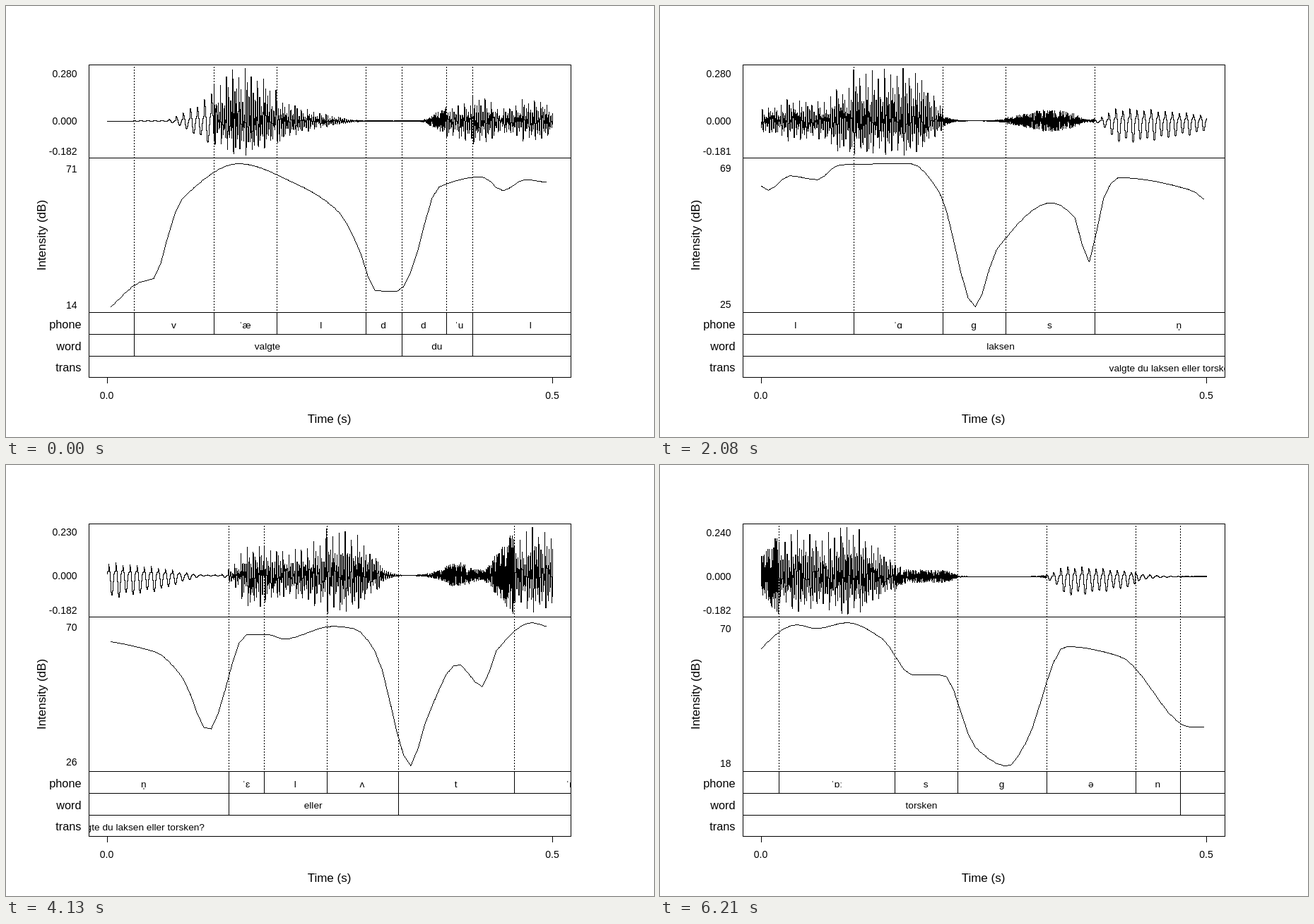
Recreate the animation shown at these times as an HTML page with a canvas. Size 917 by 611 pixels, loop 6250 ms.

```html
<!DOCTYPE html>
<html lang="da">
<head>
<meta charset="utf-8">
<title>Scrolling speech plot</title>
<style>
  html, body { margin: 0; width: 100%; height: 100%; overflow: hidden; background: #fff; }
  canvas { display: block; }
</style>
</head>
<body>
<canvas id="plot" width="917" height="611"></canvas>
<script>
const ctx = document.getElementById('plot').getContext('2d');
const LOOP = 6250, FRAMES = 150;
const PX_PER_S = 1262, SCROLL = 1.3 * PX_PER_S / (FRAMES - 1);
const LEFT = 117, RIGHT = 799, X0 = 143, X1 = 774, X_END = 2430;
const FONT = '"Liberation Sans", Arial, "DejaVu Sans", sans-serif';

// Start in seconds, label, sound, gain above and below zero
const phones = [
  [0.03, 'v', 'hum', 0.9, 0.9],
  [0.12, 'ˈæ', 'buzz', 1.035, 0.668],
  [0.19, 'l', 'buzz', 0.8, 0.7],
  [0.29, 'd', 'hiss', 1, 1],
  [0.33, 'd', 'hiss', 0.6, 0.6],
  [0.38, 'ˈu', 'buzz', 0.7, 0.8],
  [0.41, 'l', 'buzz', 0.9, 0.85],
  [0.54, 'ˈɑ', 'buzz', 1.37, 0.89],
  [0.64, 'ɡ', 'hiss', 0.6, 0.6],
  [0.71, 's', 'hiss', 1.3, 1.2],
  [0.81, 'n̩', 'hum', 0.55, 0.95],
  [1.00, 'ˈɛ', 'buzz', 0.93, 1],
  [1.04, 'l', 'buzz', 0.95, 0.85],
  [1.11, 'ʌ', 'buzz', 1.12, 0.91],
  [1.19, 't', 'hiss', 1.3, 1.2],
  [1.32, 'ˈɒː', 'buzz', 1.03, 0.78],
  [1.45, 's', 'hiss', 1.3, 1.2],
  [1.52, 'ɡ', 'hiss', 0.6, 0.6],
  [1.62, 'ə', 'hum', 0.57, 1.05],
  [1.72, 'n', 'hum', 0.6, 0.6],
  [1.77, '', 'hiss', 1, 1]
];
const words = [
  [0.03, 'valgte'], [0.33, 'du'], [0.41, 'laksen'], [1.00, 'eller'], [1.19, 'torsken'], [1.77, '']
];
const phrase = [[0.03, 'valgte du laksen eller torsken?'], [1.77, '']];

// Peaks, dips and bends of the intensity: x, dB
const bends = [
  [148, 13], [189, 23.4], [209, 25], [239, 52.3], [252, 59.3], [329, 73.2], [411, 64.6],
  [472, 52.6], [502, 35.4], [522, 20], [555, 19.5], [573, 28], [612, 63.3], [674, 67.7],
  [703, 61.8], [734, 66.5], [773, 65.2], [804, 70], [905, 70.4], [946, 61.2], [996, 24.3],
  [1027, 42.7], [1105, 57.8], [1137, 53.2], [1157, 38.6], [1178, 59.1], [1198, 65.9],
  [1300, 62], [1340, 53.5], [1376, 36.3], [1430, 67.6], [1462, 67.6], [1482, 66],
  [1552, 70.2], [1583, 69.4], [1613, 61.8], [1663, 24.8], [1683, 38.6], [1729, 57.9],
  [1764, 50.6], [1785, 62.5], [1834, 71.4], [1862, 69.9], [1905, 72.2], [1956, 65.8],
  [1996, 52.2], [2042, 52], [2087, 24], [2133, 16.8], [2158, 25.7], [2214, 63],
  [2291, 59.2], [2391, 31.9]
];

let seed = 71;
function random() {
  seed = seed + 0x6D2B79F5 | 0;
  let r = Math.imul(seed ^ seed >>> 15, 1 | seed);
  r = r + Math.imul(r ^ r >>> 7, 61 | r) ^ r;
  return ((r ^ r >>> 14) >>> 0) / 4294967296;
}

// Monotone cubic through the given points
function curve(pts) {
  const last = pts.length - 1;
  const secant = i => (pts[i + 1][1] - pts[i][1]) / (pts[i + 1][0] - pts[i][0]);
  const slopes = pts.map((p, i) => {
    if (i === 0) return secant(0);
    if (i === last) return 0;
    const a = secant(i - 1), b = secant(i);
    return a * b <= 0 ? 0 : 2 * a * b / (a + b);
  });
  return x => {
    if (x <= pts[0][0]) return pts[0][1];
    if (x >= pts[last][0]) return pts[last][1];
    let i = 0;
    while (pts[i + 1][0] < x) i++;
    const [xa, ya] = pts[i], [xb, yb] = pts[i + 1];
    const h = xb - xa, u = (x - xa) / h, v = 1 - u;
    return ya * v * v * (1 + 2 * u) + yb * u * u * (3 - 2 * u)
      + h * u * v * (slopes[i] * v - slopes[i + 1] * u);
  };
}

const RATE = 8; // samples per pixel
const dbAt = curve(bends);
const wave = makeWave();
const levels = makeLevels();

// The amplitude of the sound follows from its intensity
function makeWave() {
  const out = new Float32Array((X_END - X0) * RATE + 1);
  const amp = i => 0.314 * 10 ** ((dbAt(X0 + i / RATE) - 73.2) / 20);
  const noise = () => { const r = 2 * random() - 1; return r * Math.abs(r); };
  const sampleOf = t => Math.round(t * PX_PER_S * RATE);
  phones.forEach(([start, , sound, up, down], n) => {
    const end = n + 1 < phones.length ? sampleOf(phones[n + 1][0]) : out.length;
    let i = sampleOf(start);
    if (sound === 'hiss') {
      for (; i < end; i++) {
        const s = noise();
        out[i] = amp(i) * s * (s > 0 ? up : down);
      }
      return;
    }
    const buzz = sound === 'buzz';
    const ripples = buzz ? 3 : 1, decay = buzz ? 1.5 : 1;
    const len = Math.round((buzz ? 8.7 : 10) * RATE);
    const trough = Math.exp(-decay / (2 * ripples));
    for (let pulse = 0; i < end; pulse++) {
      const loud = amp(i) * (0.9 + 0.1 * Math.cos(2.4 * pulse));
      for (let k = 0; k < len && i < end; k++, i++) {
        const p = k / len;
        let s = Math.exp(-decay * p) * Math.cos(2 * Math.PI * ripples * p);
        if (buzz && p > 0.25) s = 0.8 * s + 0.35 * noise();
        out[i] = loud * s * (s > 0 ? up : down / trough);
      }
    }
  });
  return out;
}

function makeLevels() {
  const out = [];
  for (let x = 148.5; x < X_END; x += 0.008 * PX_PER_S) out.push([x, dbAt(x)]);
  return out;
}

const hline = (x, y, w) => ctx.fillRect(x, y, w, 1);
const vline = (x, y, h) => ctx.fillRect(x, y, 1, h);

function text(str, x, y, size, align) {
  ctx.font = size + 'px ' + FONT;
  ctx.textAlign = align;
  ctx.fillText(str, x, y);
}

// Hard-edged line
function segment(xa, ya, xb, yb) {
  const n = Math.max(1, Math.ceil(Math.max(Math.abs(xb - xa), Math.abs(yb - ya))));
  for (let i = 0; i <= n; i++) {
    ctx.fillRect(Math.floor(xa + (xb - xa) * i / n), Math.floor(ya + (yb - ya) * i / n), 1, 1);
  }
}

function drawFrame() {
  for (const y of [83, 215, 434, 465, 496, 526]) hline(LEFT, y, RIGHT - LEFT + 1);
  vline(LEFT, 83, 444);
  vline(RIGHT, 83, 444);
  vline(143, 527, 8);
  vline(773, 527, 8);
  text('0.0', 142.5, 557, 14, 'center');
  text('0.5', 773, 557, 14, 'center');
  text('Time (s)', 457.5, 591, 17, 'center');
  text('phone', 106.5, 457, 16.3, 'right');
  text('word', 106.5, 488, 16.3, 'right');
  text('trans', 106.5, 518, 16.3, 'right');
  ctx.save();
  ctx.translate(56, 325);
  ctx.rotate(-Math.PI / 2);
  text('Intensity (dB)', 0, 0, 17, 'center');
  ctx.restore();
}

function drawWave(shift) {
  const first = Math.round(shift * RATE), last = first + (X1 - X0) * RATE;
  let hi = 0, lo = 0;
  for (let i = first; i < last; i++) {
    hi = Math.max(hi, wave[i]);
    lo = Math.min(lo, wave[i]);
  }
  const scale = 122.5 / (hi - lo), zero = 88.5 + hi * scale;
  for (let x = X0; x < X1; x++) {
    const part = wave.subarray(first + (x - X0) * RATE, first + (x - X0 + 1) * RATE + 1);
    const top = Math.floor(zero - Math.max(...part) * scale);
    vline(x, top, Math.floor(zero - Math.min(...part) * scale) - top + 1);
  }
  const label = str => text(str, 100.5, Math.round(zero - str * scale) + 5, 14, 'right');
  label((Math.round(hi * 90) / 100).toFixed(3));
  label('0.000');
  label((lo * 0.9).toFixed(3));
}

function drawLevels(shift) {
  const seen = levels.filter(([x]) => x - shift >= 142.5 && x - shift <= 773.7);
  const dbs = seen.map(p => p[1]);
  const hi = Math.max(...dbs), lo = Math.min(...dbs), range = hi - lo;
  const yOf = db => 223.5 + (hi - db) / range * 203;
  for (let i = 1; i < seen.length; i++) {
    const [xa, a] = seen[i - 1], [xb, b] = seen[i];
    segment(xa - shift, yOf(a), xb - shift, yOf(b));
  }
  for (const db of [hi - 0.033 * range, lo + 0.02 * range]) {
    const shown = Math.round(db);
    text(String(shown), 100.5, Math.round(yOf(shown)) + 5, 14, 'right');
  }
}

function drawTier(marks, shift, baseline) {
  for (let i = 0; i < marks.length - 1; i++) {
    const mid = (marks[i][0] + marks[i + 1][0]) / 2;
    text(marks[i][1], 142.8 + mid * PX_PER_S - shift, baseline, 13.7, 'center');
  }
}

function drawBounds(marks, shift, y, h, dotted) {
  for (const [t] of marks) {
    const x = Math.floor(143.55 + t * PX_PER_S - shift);
    if (x <= LEFT || x >= RIGHT) continue;
    if (dotted) for (let d = 86; d < 434; d += 4) vline(x, d, 2);
    vline(x, y, h);
  }
}

function draw(n) {
  const shift = n * SCROLL;
  ctx.fillStyle = '#fff';
  ctx.fillRect(0, 0, 917, 611);
  ctx.fillStyle = '#000';
  drawFrame();
  drawWave(shift);
  drawLevels(shift);
  drawBounds(phones, shift, 434, 31, true);
  drawBounds(words, shift, 465, 31, false);
  ctx.save();
  ctx.beginPath();
  ctx.rect(LEFT, 435, RIGHT - LEFT, 91);
  ctx.clip();
  drawTier(phones, shift, 457);
  drawTier(words, shift, 487);
  drawTier(phrase, shift, 518);
  ctx.restore();
}

const begin = performance.now();
let shown = -1;
function tick() {
  // Steps fall on whole hundredths of a second
  const t = (performance.now() - begin + 5) % LOOP;
  const n = Math.min(FRAMES - 1, Math.floor(t * FRAMES / LOOP));
  if (n !== shown) draw(shown = n);
  requestAnimationFrame(tick);
}
tick();
</script>
</body>
</html>
```
